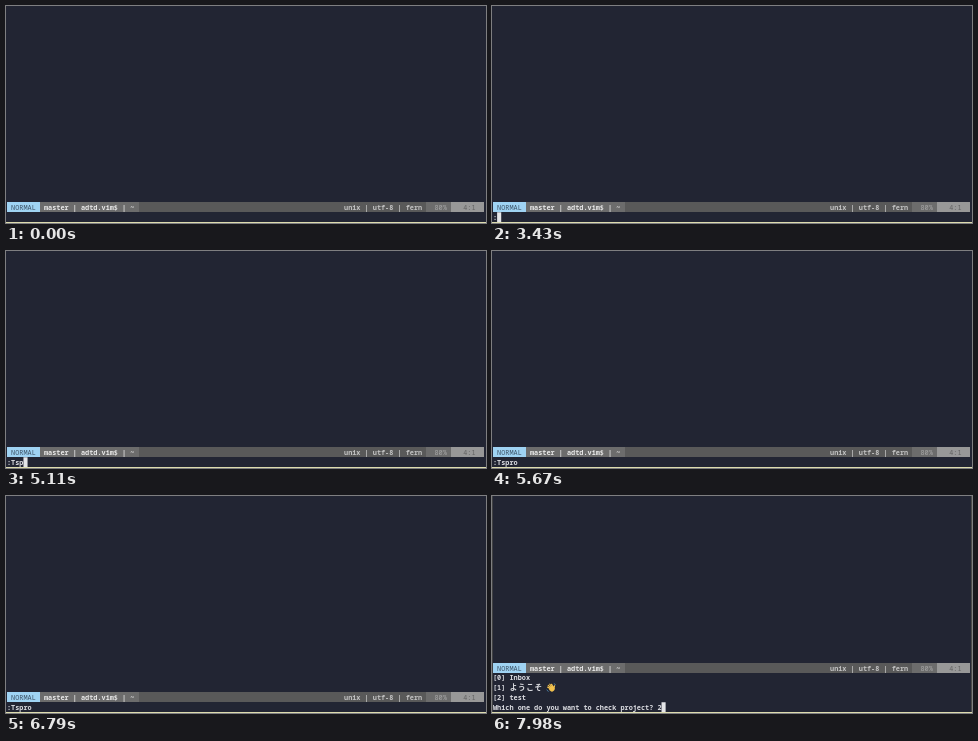
Write an HTML page with a canvas that moves like this. It is 480 px wide and 217 px high and loops after 8000 ms.

```html
<!DOCTYPE html>
<html lang="en">
<head>
<meta charset="utf-8">
<title>Terminal</title>
<style>
html, body { margin: 0; width: 100%; height: 100%; overflow: hidden; background: #222533; }
canvas { display: block; width: 480px; height: 217px; }
</style>
</head>
<body>
<canvas id="stage"></canvas>
<script>
const W = 480, H = 217, LOOP = 8000;
const CELL = 4.11, ROW = 9.75, LEFT = 1, LAST_ROW = 206.25;
const MONO = '6.85px "Noto Sans Mono", "DejaVu Sans Mono", monospace';
const BOLD = 'bold ' + MONO;
const KANA = 'bold 7.6px "Noto Sans CJK JP", "Noto Sans CJK", sans-serif';
const FG = '#dcdde2';

// Command line: time of each key
const KEYS = [[3430, ':'], [3990, 'T'], [4620, 's'], [5110, 'p'], [5250, 'r'], [5390, 'o']];
const ENTER = 5670, LIST = 6860, ANSWER = 7840;

const canvas = document.getElementById('stage');
const ctx = canvas.getContext('2d');
const dpr = window.devicePixelRatio || 1;
canvas.width = W * dpr;
canvas.height = H * dpr;
ctx.scale(dpr, dpr);

const colX = col => LEFT + col * CELL;

function rect(x, y, w, h, color) {
  ctx.fillStyle = color;
  ctx.fillRect(x, y, w, h);
}

// Each character sits in its own terminal cell
function text(str, col, top, color = FG, font = BOLD) {
  ctx.font = font;
  ctx.fillStyle = color;
  ctx.textAlign = 'left';
  [...str].forEach((ch, i) => ctx.fillText(ch, colX(col + i), top + 7.4));
}

function kana(str, col, top) {
  ctx.font = KANA;
  ctx.fillStyle = FG;
  ctx.textAlign = 'center';
  [...str].forEach((ch, i) => ctx.fillText(ch, colX(col + 2 * i + 1), top + 7.7));
}

function cursor(col, top) {
  rect(colX(col), top, CELL, ROW, '#e4e5e8');
}

function stroke(points, width, color) {
  ctx.strokeStyle = color;
  ctx.lineWidth = width;
  ctx.lineCap = 'round';
  ctx.beginPath();
  points.forEach(([x, y], i) => i ? ctx.lineTo(x, y) : ctx.moveTo(x, y));
  ctx.stroke();
}

function hand(x, y) {
  const skin = '#f2c14e';
  ctx.save();
  ctx.translate(x, y);
  ctx.fillStyle = skin;
  ctx.beginPath();
  ctx.ellipse(5.5, 6, 2.8, 2.7, 0.7, 0, Math.PI * 2);
  ctx.fill();
  [[1.3, 4.4], [1.9, 2.6], [3.4, 1.5], [5.1, 1.6]].forEach(([fx, fy], i) =>
    stroke([[fx, fy], [4 + i, 6 - i * 0.4]], 1.3, skin));
  stroke([[7.3, 5.6], [8, 3.2]], 1.3, skin);
  stroke([[0.5, 7.2], [1.8, 8.7]], 0.6, '#5da9dc');
  stroke([[7.7, 0.9], [9.1, 2]], 0.6, '#5da9dc');
  ctx.restore();
}

function statusLine(y) {
  const top = y + 0.2;
  rect(1, y, 477, 10, '#595959');
  rect(1, y, 33, 10, '#9fd3f3');
  rect(34, y, 99, 10, '#6c6c6c');
  rect(420, y, 25, 10, '#6c6c6c');
  rect(445, y, 33, 10, '#989898');
  text('NORMAL', 1, top, '#3f566a', MONO);
  text('master | adtd.vim$ | ~', 9, top, '#e8e8e8');
  text('unix | utf-8 | fern', 82, top, '#c2c2c2');
  text('80%', 104, top, '#a8a8a8', MONO);
  text('4:1', 111, top, '#626262', MONO);
}

function commandLine(t) {
  const typed = KEYS.filter(([at]) => t >= at).map(([, ch]) => ch).join('');
  if (!typed) return;
  text(typed, 0, LAST_ROW);
  if (t < ENTER) cursor(typed.length, LAST_ROW);
}

function projectList(t) {
  const rowY = n => LAST_ROW - (3 - n) * ROW;
  const prompt = 'Which one do you want to check project? ' + (t >= ANSWER ? '2' : '');
  text('[0] Inbox', 0, rowY(0));
  text('[1]', 0, rowY(1));
  kana('ようこそ', 4, rowY(1));
  hand(colX(13), rowY(1));
  text('[2] test', 0, rowY(2));
  text(prompt, 0, rowY(3));
  cursor(prompt.length, rowY(3));
}

function draw(t) {
  rect(0, 0, W, H, '#222533');
  if (t < LIST) {
    statusLine(196);
    commandLine(t);
  } else {
    statusLine(167);
    projectList(t);
    rect(0, 0, 0.6, H, '#55564f');
    rect(479.2, 0, 0.8, H, '#55564f');
  }
  rect(0, 216, W, 1, '#dddcae');
}

const start = performance.now();
function tick() {
  draw((performance.now() - start) % LOOP);
  requestAnimationFrame(tick);
}
tick();
</script>
</body>
</html>
```
